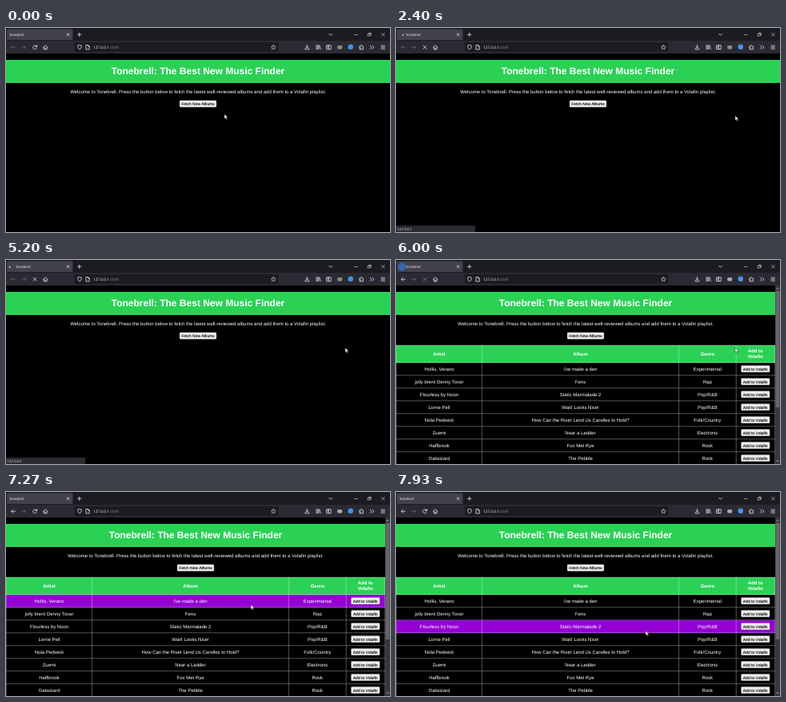
An HTML page for the animation above (8 s loop, 480 by 256 pixels).

```html
<!DOCTYPE html>
<html lang="en">
<head>
<meta charset="utf-8">
<title>Tonebrell</title>
<style>
  html, body { margin: 0; width: 100%; height: 100%; overflow: hidden; background: #000; }
  svg { display: block; width: 480px; height: 256px; }
  text { text-rendering: geometricPrecision; }
  .ui { font-family: "Open Sans", "Noto Sans", sans-serif; fill: #fbfbfe; }
  .page { font: 6px "Liberation Sans", Arial, sans-serif; fill: #fff; text-anchor: middle; }
  .bold { font-weight: bold; }
  .btn rect { fill: #f0f0f3; stroke: #b4b4bc; stroke-width: .3; }
  .btn text { font-size: 5px; fill: #000; stroke: #000; stroke-width: .12; }
  .icon { fill: none; stroke: #e4e4ea; stroke-width: .8; stroke-linecap: round; stroke-linejoin: round; }
  .rule { stroke: #fff; stroke-opacity: .4; stroke-width: .8; }
</style>
</head>
<body>
<svg viewBox="0 0 480 256">
  <defs><clipPath id="tabClip"><rect x="1" y="1.5" width="82.5" height="13.5" rx="1.5"/></clipPath></defs>

  <rect width="480" height="256"/>
  <g class="page">
    <rect y="40" width="480" height="29" fill="#2ad155"/>
    <g id="intro">
      <text class="bold" x="240" y="58.3" font-size="12">Tonebrell: The Best New Music Finder</text>
      <text x="240" y="82.1">Welcome to Tonebrell. Press the button below to fetch the latest well-reviewed albums and add them to a Volafin playlist.</text>
      <g class="btn">
        <rect id="fetch" x="217.1" y="91.1" width="45.8" height="8.1" rx="1"/>
        <text x="240" y="97">Fetch New Albums</text>
      </g>
    </g>
    <g id="results">
      <rect y="107" width="474" height="22" fill="#2ad155"/>
      <rect id="hover" width="474" height="16" fill="#9400d3"/>
      <g id="table"></g>
      <rect x="474" y="32" width="6" height="224" fill="#38373b"/>
      <rect x="474.4" y="39" width="5.2" height="146" fill="#66666a"/>
      <path d="M475.5 36.5 477 34.5 478.5 36.5ZM475.5 251.5 477 253.5 478.5 251.5Z" fill="#aaa"/>
    </g>
  </g>

  <g id="status">
    <rect y="248" width="99" height="8" fill="#2b2a33"/>
    <text class="ui" x="1.5" y="253.8" font-size="4.4">127.0.0.1</text>
  </g>

  <rect width="480" height="16.5" fill="#1c1b22"/>
  <rect y="16" width="480" height="16" fill="#2b2a33"/>
  <rect x="1" y="1.5" width="82.5" height="13.5" rx="1.5" fill="#42414d"/>
  <g clip-path="url(#tabClip)"><circle id="burst" cx="7.5" cy="8.5" fill="#2f78d8"/></g>
  <ellipse id="dot" cy="8.8" rx="1.2" ry=".95" fill="#c4c4cc"/>
  <text class="ui" id="tabTitle" y="10.1" font-size="4.3">Tonebrell</text>

  <rect x="86" y="18" width="254.5" height="12" rx="1.5" fill="#1c1b22"/>
  <text class="ui" x="109" y="25.9" font-size="4.7">127.0.0.1<tspan fill="#8c8b94">:5000</tspan></text>

  <g class="icon">
    <path d="M76.3 6.8 79.1 9.6M79.1 6.8 76.3 9.6M89.5 8.3H94M91.75 6V10.6"/>
    <path d="M403.7 7.3 405.6 9.2 407.5 7.3"/>
    <path d="M435.3 8.5H439M452.5 7.3H455.3V10H452.5ZM453.5 7V6.3H456.3V9H455.5M469.7 6.5 473.3 10.1M473.3 6.5 469.7 10.1" stroke-width=".6"/>
    <path id="back" d="M11.6 24.2H6.7M8.9 22 6.7 24.2 8.9 26.4"/>
    <path d="M19.8 24.2H24.7M22.5 22 24.7 24.2 22.5 26.4" stroke="#65646d"/>
    <path id="reload" d="M38.2 23.2A2.4 2.4 0 1 0 38.3 25.2M38.6 21.4V23.5H36.5"/>
    <path id="stop" d="M34 22.2 38 26.2M38 22.2 34 26.2"/>
    <path d="M46.4 24.3 49.2 21.6 52 24.3M47.3 23.8V26.8H51.1V23.8M49.2 26.6V25"/>
    <path d="M92 21.3 94.3 22.2C94.4 24.6 93.7 26 92 27 90.3 26 89.6 24.6 89.7 22.2Z"/>
    <path d="M100.3 21.5H102.7L104.3 23.1V26.9H100.3ZM102.6 21.6V23.2H104.2"/>
    <path d="M334.3 21.3 335.2 23.2 337.2 23.4 335.7 24.8 336.1 26.8 334.3 25.8 332.5 26.8 332.9 24.8 331.4 23.4 333.4 23.2Z" stroke-width=".6"/>
    <path d="M376.4 21.5V25M374.8 23.5 376.4 25.1 378 23.5M374 25.6V26.8H378.8V25.6"/>
    <path d="M388 21.6V26.6M389.6 21.6V26.6M391 21.6V26.6M392 22 393.2 26.6"/>
    <path d="M401 21.8H406.2V26.6H401ZM403.3 21.8V26.6M402 23.2H402.4M402 24.5H402.4"/>
    <path d="M442 23.2H443.3C442.8 20.9 445.6 20.9 445.1 23.2H446.5V26.7H442V25.6C443.8 25.8 443.8 24 442 24.3Z"/>
    <path d="M455.2 22.2 457.2 24.2 455.2 26.2M458 22.2 460 24.2 458 26.2"/>
    <path d="M469 22.2H473.4M469 24.2H473.4M469 26.2H473.4"/>
  </g>
  <rect id="addon" x="414.2" y="22" width="6" height="4.4" rx="1.4"/>
  <circle cx="430.8" cy="23.8" r="3.3" fill="#4a92e6"/>

  <path id="cursor" d="M0 0V6L1.4 4.8 2.4 7 3.4 6.6 2.4 4.4H4.3Z" fill="#fff" stroke="#111" stroke-width=".45"/>
</svg>
<script>
const $ = id => document.getElementById(id);
const LOOP = 8000, STEP = 200 / 3;
const LOAD = 1000, DONE = 5930, BURST_END = 6330, RELOAD = 6530;
const TOP = 129, ROW = 16;

const albums = [
  ["Hollis, Verano", "i've made a den", "Experimental"],
  ["jolly brent Denny Tovar", "Fens", "Rap"],
  ["Flourless by Noon", "Static Marmalade 2", "Pop/R&B"],
  ["Lorrie Pell", "Wait! Looks Nice!", "Pop/R&B"],
  ["Nola Pedwick", "How Can the River Lend Us Candles to Hold?", "Folk/Country"],
  ["Zuemi", "Near a Ladder", "Electronic"],
  ["Halfbrook", "Fox Met Rye", "Rock"],
  ["Oatwizard", "The Pebble", "Rock"]
];
const columns = [54, 230.5, 389.3, 449.2];

// time, x, y of the pointer tip
const path = [
  [0, 273, 108], [70, 273, 108], [530, 252, 95], [1000, 252, 95], [1750, 424, 110],
  [6130, 424, 110], [6930, 306, 127], [7000, 306, 131], [7390, 306, 146],
  [7467, 306, 148.3], [7800, 311, 174], [7930, 312, 174], [LOOP, 312, 174]
];

function add(parent, tag, attrs, content) {
  const el = document.createElementNS("http://www.w3.org/2000/svg", tag);
  for (const key in attrs) el.setAttribute(key, attrs[key]);
  if (content) el.textContent = content;
  return parent.appendChild(el);
}

function buildTable() {
  const table = $("table");
  const head = (x, y, label) => add(table, "text", { x, y, class: "bold" }, label);
  ["Artist", "Album", "Genre"].forEach((label, i) => head(columns[i], 120.1, label));
  head(columns[3], 116.4, "Add to");
  head(columns[3], 123.4, "Volafin");

  albums.forEach((cells, r) => {
    const y = TOP + r * ROW;
    cells.forEach((cell, c) => add(table, "text", { x: columns[c], y: y + 10 }, cell));
    const btn = add(table, "g", { class: "btn" });
    add(btn, "rect", { x: 431.5, y: y + 3.6, width: 35.6, height: 8.1, rx: 1 });
    add(btn, "text", { x: columns[3], y: y + 9.5 }, "Add to Volafin");
    add(table, "path", { d: `M0 ${y - .3}H474`, class: "rule" });
  });
  for (const x of [.3, 107.6, 353.6, 425.2, 473.7])
    add(table, "path", { d: `M${x} 107V256`, class: "rule" });
  add(table, "path", { d: "M0 107H474", class: "rule" });
}

function pointer(t) {
  const i = Math.max(1, path.findIndex(p => p[0] >= t));
  const [t0, x0, y0] = path[i - 1], [t1, x1, y1] = path[i];
  const k = (t - t0) / (t1 - t0);
  return [x0 + (x1 - x0) * k, y0 + (y1 - y0) * k];
}

const set = (id, name, value) => $(id).setAttribute(name, value);
const show = (id, on) => set(id, "visibility", on ? "visible" : "hidden");

function render(t) {
  const [x, y] = pointer(t);
  set("cursor", "transform", `translate(${x} ${y})`);

  const loading = t >= LOAD && t < DONE, loaded = t >= DONE;
  show("status", t >= LOAD + 60 && !loaded);
  show("results", loaded);
  set("intro", "transform", `translate(${loaded ? -3 : 0})`);
  set("tabTitle", "x", t >= LOAD && t < BURST_END ? 12 : 4);

  show("dot", loading);
  set("dot", "cx", 8.5 - 4.3 * Math.cos((t - LOAD - 80) / 1050 * 2 * Math.PI));
  const p = (t - DONE) / (BURST_END - DONE);
  show("burst", p >= 0 && p < 1);
  set("burst", "r", 2.8 + 12 * Math.max(p, 0));
  set("burst", "opacity", Math.min(1, Math.max(0, 1 - p)) * .85);

  const stopping = t >= LOAD && t < RELOAD;
  show("stop", stopping);
  show("reload", !stopping);
  set("stop", "stroke", loaded ? "#77767f" : "#e4e4ea");
  set("back", "stroke", loaded ? "#e4e4ea" : "#65646d");
  set("addon", "fill", loaded ? "#a3a9ad" : "#7f957f");

  const over = t > 400 && t < 1090, pressed = t > 720 && t < 795;
  $("fetch").style.fill = pressed ? "#b1b1b9" : over ? "#d0d0d7" : "";

  // row highlight trails the pointer by one step
  const row = Math.floor((pointer(Math.max(0, t - STEP))[1] - TOP) / ROW);
  const lit = t > 7010 && row >= 0;
  set("hover", "visibility", lit ? "inherit" : "hidden");
  set("hover", "y", TOP + Math.max(row, 0) * ROW);
}

buildTable();
const start = performance.now();
function tick(now) {
  const t = Math.max(0, now - start) % LOOP;
  render(Math.min(Math.floor((t + 4) / STEP) * STEP, LOOP - STEP));
  requestAnimationFrame(tick);
}
render(0);
requestAnimationFrame(tick);
</script>
</body>
</html>
```
